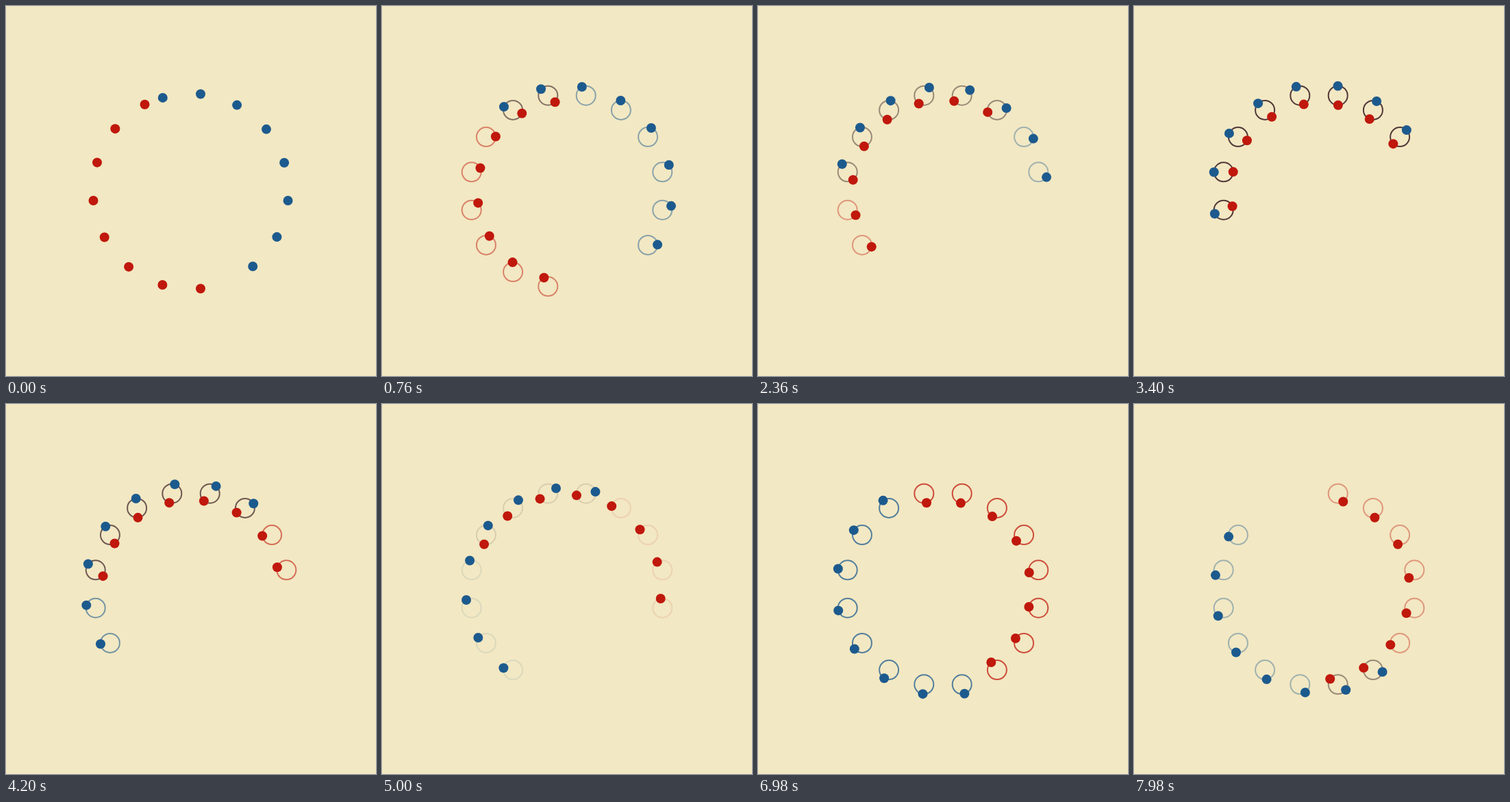
Animation of 540x540 px, one loop 8000 ms. Source, as an HTML page with a canvas:

```html
<!DOCTYPE html>
<html lang="en">
<head>
<meta charset="utf-8">
<title>Weaving dots</title>
<style>
  html, body { margin: 0; width: 100%; height: 100%; overflow: hidden; background: #f2e8c3; }
  canvas { display: block; width: 540px; height: 540px; }
</style>
</head>
<body>
<canvas width="540" height="540"></canvas>
<script>
const ctx = document.querySelector('canvas').getContext('2d');
const LOOP = 8000, HALF_TURN = 450, LEAD = 5;
const CENTER = 270, PATH_RADIUS = 142, RING_RADIUS = 14, DOT_RADIUS = 7;
const SLOTS = 32, DOTS = 8;
const BLUE = '#1c5a8e', RED = '#c0180c', SHARED = '#4a3032';

// Angles run clockwise from the top.
const polar = (x, y, r, a) => [x + r * Math.sin(a), y - r * Math.cos(a)];
const slotAngle = slot => slot * 2 * Math.PI / SLOTS;
const slotCenter = slot => polar(CENTER, CENTER, PATH_RADIUS, slotAngle(slot));
const wrap = slot => (slot % SLOTS + SLOTS) % SLOTS;

// Every second slot is occupied, counting back from the first one.
const chain = first => Array.from({ length: DOTS }, (_, i) => wrap(first - 2 * i));

function drawRing(slot, color, alpha) {
  ctx.globalAlpha = alpha;
  ctx.strokeStyle = color;
  ctx.beginPath();
  ctx.arc(...slotCenter(slot), RING_RADIUS, 0, 2 * Math.PI);
  ctx.stroke();
}

function drawDot(slot, turn, color) {
  const [x, y] = polar(...slotCenter(slot), RING_RADIUS, slotAngle(slot) + turn);
  ctx.fillStyle = color;
  ctx.beginPath();
  ctx.arc(x, y, DOT_RADIUS, 0, 2 * Math.PI);
  ctx.fill();
}

function draw(time) {
  const steps = (time + LEAD) / HALF_TURN;
  const step = Math.floor(steps), u = steps - step;
  const direction = step % 2 ? -1 : 1;
  const turn = Math.PI / 2 + direction * Math.PI * u;
  const fade = Math.sin(Math.PI * u) ** 2;
  const blue = chain(12 - step), red = chain(step - 2);

  ctx.globalAlpha = 1;
  ctx.fillStyle = '#f2e8c3';
  ctx.fillRect(0, 0, 540, 540);

  ctx.lineWidth = 2;
  for (const slot of new Set([...blue, ...red])) {
    const hasBlue = blue.includes(slot), hasRed = red.includes(slot);
    if (hasBlue && hasRed) drawRing(slot, SHARED, fade);
    else drawRing(slot, hasBlue ? BLUE : RED, 0.75 * fade);
  }

  ctx.globalAlpha = 1;
  for (const slot of blue) drawDot(slot, turn, BLUE);
  for (const slot of red) drawDot(slot, turn + Math.PI, RED);
}

let start;
function tick(now) {
  start ??= now;
  draw((now - start) % LOOP);
  requestAnimationFrame(tick);
}
draw(0);
requestAnimationFrame(tick);
</script>
</body>
</html>
```
